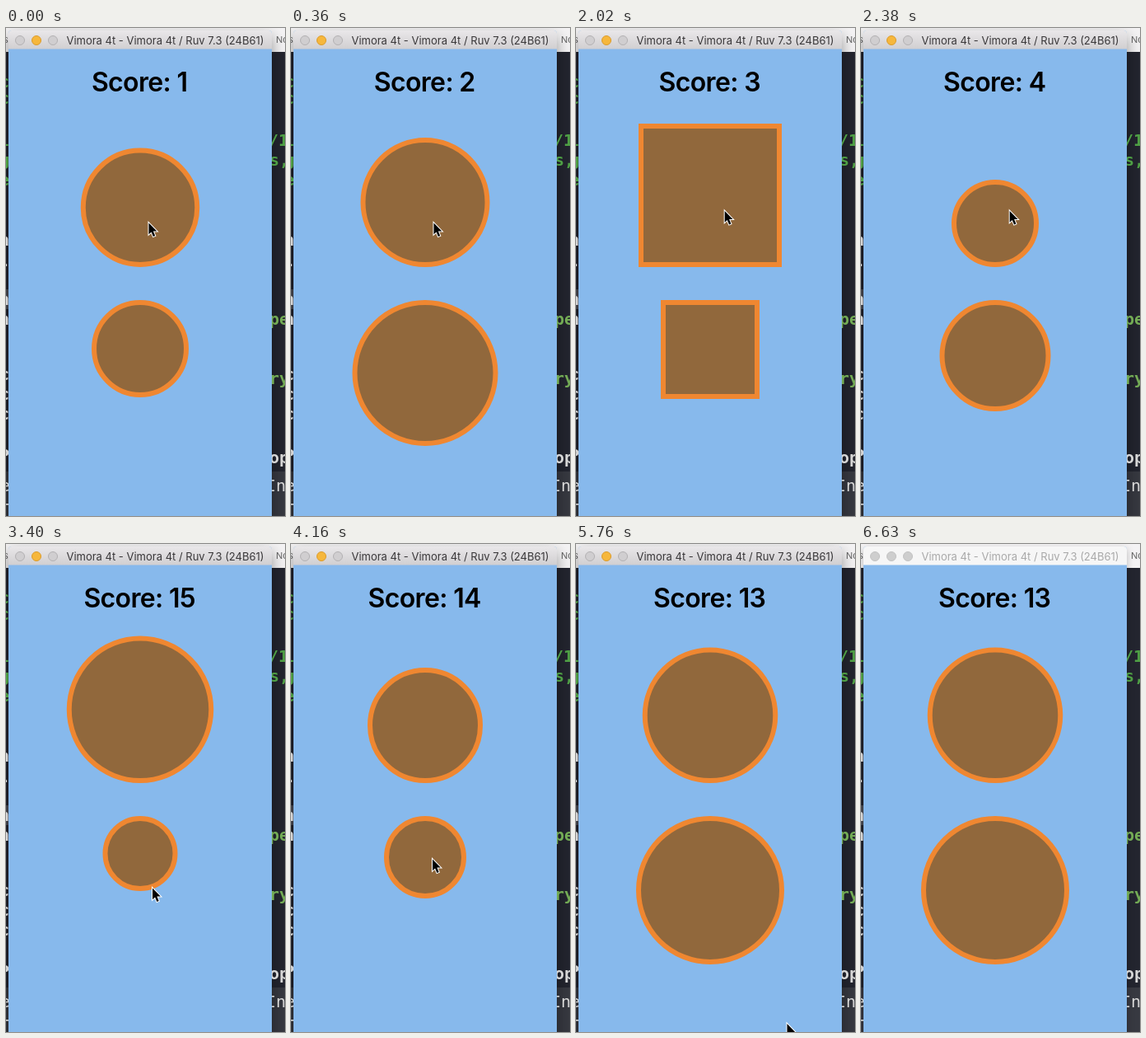
An HTML page that plays this animation: 339 px wide and 592 px high, repeating every 6730 ms.

```html
<!DOCTYPE html>
<html lang="en">
<head>
<meta charset="utf-8">
<title>Score game</title>
<style>
html, body { margin: 0; width: 100%; height: 100%; overflow: hidden; background: #22242e; }
svg { display: block; width: 100%; height: 100%; }
.code { font: 700 20px "DejaVu Sans Mono", monospace; white-space: pre; }
.tab { font: 11px Inter, sans-serif; fill: #666; }
.title { font: 13px Inter, sans-serif; fill: #3a383a; }
.score { font: 600 32px Inter, sans-serif; letter-spacing: -.02em; }
.title, .score { text-anchor: middle; }
.sky { fill: #87b9ec; }
.frame { filter: drop-shadow(0 7px 9px rgba(0, 0, 0, .4)); }
.bar { fill: url(#bar); }
.light { fill: #d0ced0; stroke: #b3b1b3; }
.mid { fill: #f6b73c; stroke: #dc9c2c; }
.shape { fill: #91683c; stroke: #ef8731; stroke-width: 6; }
.idle .frame { filter: drop-shadow(0 3px 4px rgba(0, 0, 0, .25)); }
.idle .bar { fill: #f6f6f6; }
.idle .title { fill: #a9a9a9; }
.idle .light { fill: #cecece; stroke: #c2c2c2; }
</style>
</head>
<body>
<svg id="stage" viewBox="0 0 339 592">
  <defs>
    <linearGradient id="bar" x2="0" y2="1">
      <stop stop-color="#e9e7e9"/>
      <stop offset="1" stop-color="#d1cfd1"/>
    </linearGradient>
  </defs>
  <rect width="339" height="592" fill="#23252f"/>
  <rect y="317" width="6" height="24" fill="#4a4c55"/>
  <rect y="538" width="339" height="54" fill="#373941"/>
  <rect width="339" height="29" fill="#f4f3f4"/>
  <text class="tab" x="-3" y="18">s</text>
  <text class="tab" x="328" y="18">No</text>
  <rect class="sky frame" x="3" y="3" width="320" height="600" rx="4"/>
  <g id="code" class="code"></g>
  <rect class="sky" x="3" y="25" width="320" height="567"/>
  <path class="bar" d="M3 25.5V7q0-4 4-4H319q4 0 4 4V25.5z"/>
  <circle class="light" cx="17" cy="15" r="5.5"/>
  <circle class="light mid" id="mid" cx="37" cy="15" r="5.5"/>
  <circle class="light" cx="57" cy="15" r="5.5"/>
  <text class="title" x="193.5" y="20">Vimora 4t - Vimora 4t / Ruv 7.3 (24B61)</text>
  <text class="score" id="score" x="162.2" y="77"></text>
  <rect class="shape" id="upper"/>
  <rect class="shape" id="lower"/>
  <path id="cursor" d="M0 0V13.8L3.1 11 5.4 16.4 7.7 15.4 5.4 10.1H9.8Z" stroke="#fff" stroke-width="2" paint-order="stroke"/>
</svg>
<script>
const LOOP = 6730, IDLE_AT = 6630, CX = 163;
const $ = id => document.getElementById(id);

// start, score, upper size, lower size, square
const rounds = [
  [0, 1, 144.5, 118],
  [360, 2, 157, 177],
  [1370, 3, 174, 120, true],
  [2380, 4, 106, 135],
  [3400, 15, 178.5, 91],
  [4160, 14, 140, 100],
  [4700, 13, 164.5, 180]
];

// first step, last step, step count, target x, y, sideways bend
const home = [173.5, 236.5];
const moves = [
  [720, 1070, 7, 170.5, 406, 0],
  [1670, 2020, 7, 180.7, 222, 21],
  [2800, 3100, 6, 178, 417.5, 0],
  [3760, 3920, 4, 172, 382.5, 0],
  [5300, 5460, 4, 255, 564, 0],
  [5760, 5820, 2, 258, 600, 0]
];

// x, baseline, text, colour, weight
const green = "#4fa045", lime = "#73ab55", pale = "#d6d6d6";
const code = [
  [-8, 72, "c", green], [-8, 92, "c", green], [-8, 143, "l", green],
  [-8, 167, "g", green], [-8, 191, "e", green], [-8, 264, "n", pale],
  [-8, 293, "-", pale], [-8, 336, "n", pale], [-8, 360, "n", pale],
  [-8, 427, "c", pale], [-8, 451, "c", pale], [-8, 475, "c", pale],
  [-8, 525, "P", pale], [-7, 562, "e", pale, 400], [-8, 591, "T", pale, 400],
  [319, 143, "/1", green], [320, 167, "s,", green], [320, 360, "pe", lime],
  [320, 432, "ry", lime], [320, 528, "op", pale], [316, 562, "In", pale, 400]
];

function setAttrs(el, attrs) {
  for (const key in attrs) el.setAttribute(key, attrs[key]);
}

for (const [x, y, text, fill, weight = 700] of code) {
  const el = document.createElementNS("http://www.w3.org/2000/svg", "text");
  setAttrs(el, { x, y, fill, "font-weight": weight });
  el.textContent = text;
  $("code").append(el);
}

function place(el, size, top, square) {
  const inner = size - 6;
  setAttrs(el, { x: CX - inner / 2, y: top + 3, width: inner, height: inner, rx: square ? 0 : inner / 2 });
}

function cursorAt(t) {
  let [x, y] = home;
  for (const [from, to, steps, tx, ty, bend] of moves) {
    if (t < from) break;
    const step = Math.floor((t - from) / (to - from) * (steps - 1) + 1e-6) + 1;
    const p = Math.min(1, step / steps);
    const e = p * p * (3 - 2 * p);
    x += (tx - x) * e + 2 * bend * e * (1 - e);
    y += (ty - y) * e;
  }
  return [x, y];
}

let shown;
function draw(t) {
  const round = rounds.findLast(r => r[0] <= t);
  if (round !== shown) {
    const [, score, upper, lower, square] = shown = round;
    $("score").textContent = "Score: " + score;
    place($("upper"), upper, 290 - upper, square);
    place($("lower"), lower, 330, square);
  }
  $("cursor").setAttribute("transform", `translate(${cursorAt(t)})`);
  const idle = t >= IDLE_AT;
  $("stage").classList.toggle("idle", idle);
  $("mid").classList.toggle("mid", !idle);
}

const start = performance.now();
function tick() {
  draw((performance.now() - start) % LOOP);
  requestAnimationFrame(tick);
}
tick();
</script>
</body>
</html>
```
